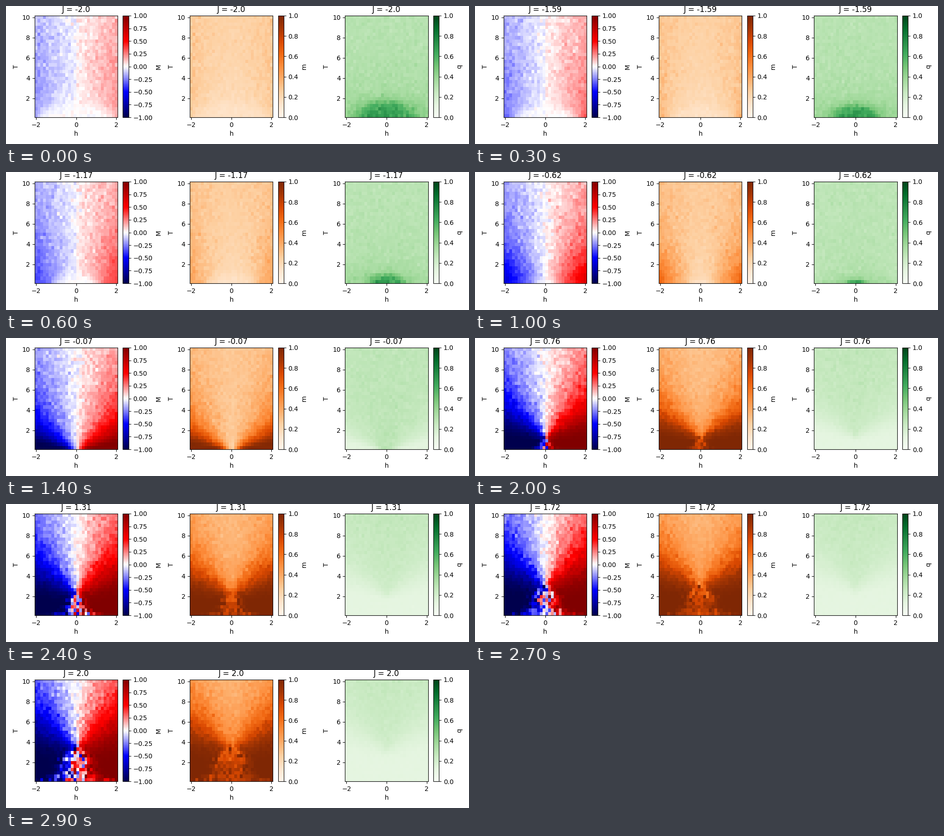
Animation of 1000x300 px, one loop 3000 ms. Source, as a matplotlib script:

```python
import numpy as np
import matplotlib.pyplot as plt
from matplotlib.animation import FuncAnimation

WIDTH, HEIGHT, DPI = 1000, 300, 100
FRAMES, INTERVAL = 30, 100
CELLS = 30

plt.rcParams["font.family"] = "DejaVu Sans"

h_axis = np.linspace(-2, 2, CELLS)
t_axis = np.linspace(0.3, 10, CELLS)
h, T = np.meshgrid(h_axis, t_axis)
couplings = np.linspace(-2, 2, FRAMES)


def sigmoid(x):
    return 1 / (1 + np.exp(-np.clip(x, -50, 50)))


def bethe_magnetisation(J):
    """Ising magnetisation on a lattice where each spin has three neighbours."""
    t = np.tanh(J / T)
    u = 0.1 * h
    for _ in range(80):
        target = T * np.arctanh(t * np.tanh((h + 2 * u) / T) * (1 - 1e-12))
        u = u + 0.35 * (target - u)
    return np.tanh((h + 3 * u) / T)


def fields(frame):
    J = couplings[frame]
    rng = np.random.default_rng(100 + frame)

    def noise():
        return rng.normal(size=T.shape)

    effective = 0.88 * J if J > 0 else J
    t = np.tanh(effective / T)
    M = bethe_magnetisation(effective)
    dome = np.zeros_like(T)
    if J < 0:
        # Frustrated spins that give way once the field exceeds the coupling.
        loose = sigmoid((abs(h) - abs(J)) / (0.08 + 0.3 * T))
        M = M * (1 - 0.35 * t**2)
        M = M + 0.34 * np.sign(h) * loose * abs(t) * (1 - abs(M))
        radius = np.hypot(T / abs(J), h / (0.85 * abs(J)))
        dome = sigmoid((0.85 - radius) / 0.13)
    corr = M**2 + (1 - M**2) * t

    # Thermal fluctuations, largest near the critical line.
    spread = 0.015 + 0.028 * np.sqrt((1 + t) / np.maximum(1 - 2 * t, 0.06))
    M = M + spread * (1 - M**2) * noise()

    # Cold ferromagnets stay stuck in mixed domains at weak field.
    reach = 0.45 * max(J - 0.3, 0) * (1 + 1.2 * np.exp(-(T - 0.3) / 0.35))
    reach = reach * np.clip((2 * J - T) / (0.8 * abs(J)), 0, 1) + 1e-6
    stuck = np.exp(-np.minimum((abs(h) / reach) ** 3, 50))
    mixed = 0.45 * np.clip(h / reach, -1, 1) + 0.42 * noise()
    M = np.clip(M * (1 - stuck) + mixed * stuck, -1, 1)

    local = 0.19 + 0.59 * sigmoid(4 * (J / T - 0.42)) - 0.04 * dome
    m = np.sqrt(M**2 + local**2 * (1 - M**2))
    m = m + (0.008 + 0.06 * local**2) * (1 - M**2) * noise()

    q = 0.28 - np.where(corr > 0, 0.155, 0.11) * corr + 0.28 * dome
    q = q + (0.003 + 0.009 * (1 - corr) * (1 - M**2) + 0.02 * dome) * noise()
    return M, np.clip(m, 0, 1), np.clip(q, 0, 1)


fig = plt.figure(figsize=(WIDTH / DPI, HEIGHT / DPI), dpi=DPI, facecolor="white")


def pixel_axes(left, width):
    return fig.add_axes([left / WIDTH, 58 / HEIGHT, width / WIDTH, 221 / HEIGHT])


def make_panel(index, label, cmap, low, ticks):
    left = 61.9 + 335.2 * index
    ax = pixel_axes(left, 179.35)
    mesh = ax.pcolormesh(h_axis, t_axis, np.zeros_like(T), cmap=cmap,
                         vmin=low, vmax=1, shading="nearest")
    ax.set_xticks([-2, 0, 2])
    ax.set_yticks(range(2, 11, 2))
    ax.set_xlabel("h")
    ax.set_ylabel("T")
    bar = fig.colorbar(mesh, cax=pixel_axes(left + 190.5, 12.3), ticks=ticks)
    bar.set_label(label)
    return mesh, ax.set_title("")


panels = [
    make_panel(0, "M", "seismic", -1, np.linspace(-1, 1, 9)),
    make_panel(1, "m", "Oranges", 0, np.linspace(0, 1, 6)),
    make_panel(2, "q", "Greens", 0, np.linspace(0, 1, 6)),
]


def update(frame):
    for (mesh, title), values in zip(panels, fields(frame)):
        mesh.set_array(values)
        title.set_text(f"J = {round(float(couplings[frame]), 2)}")
    return [artist for panel in panels for artist in panel]


anim = FuncAnimation(fig, update, frames=FRAMES, interval=INTERVAL,
                     repeat=True, repeat_delay=0, blit=False)
plt.show()
```
